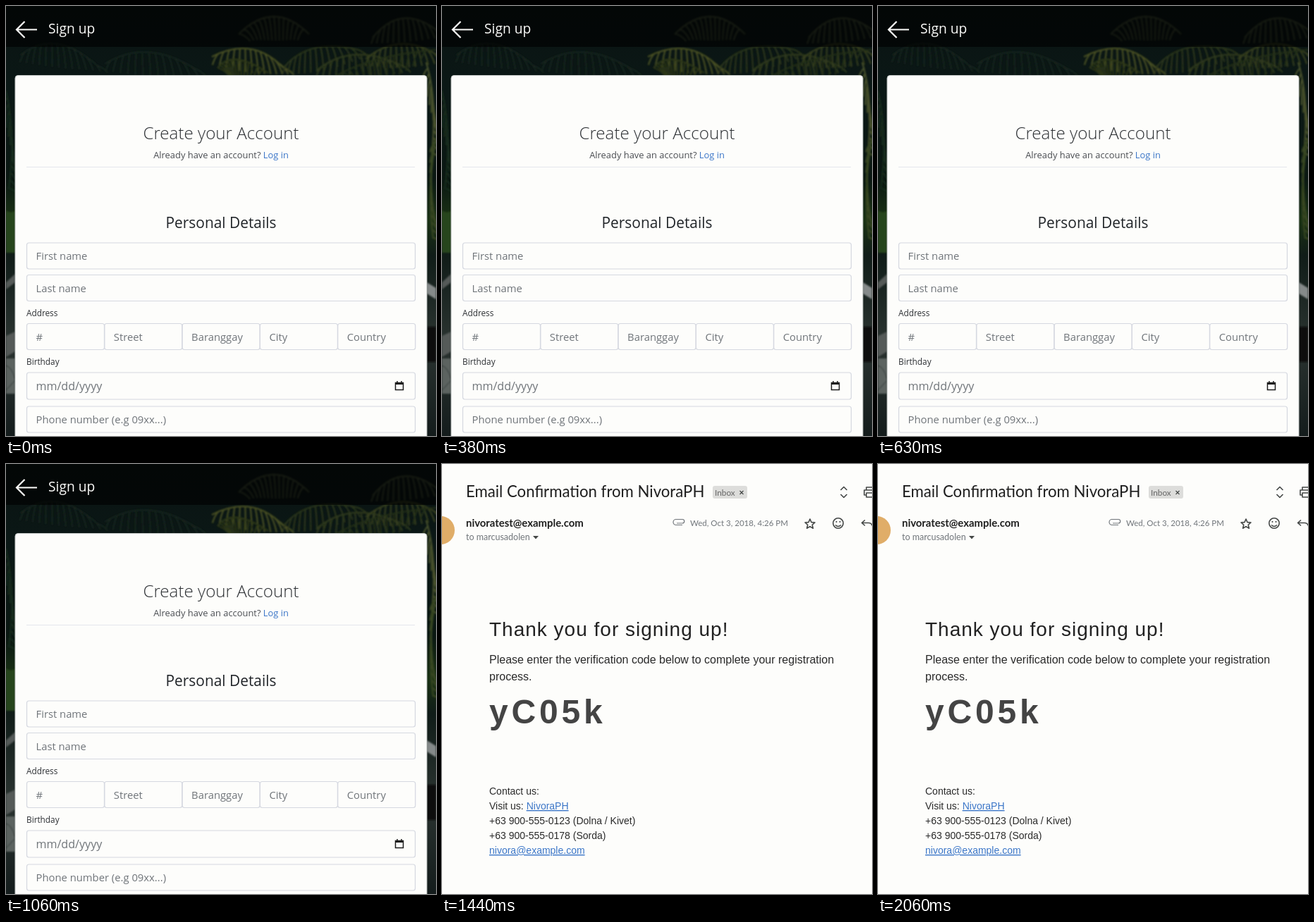
Write an HTML page that moves like this. It is 610 px wide and 610 px high and loops after 2.12 s.

```html
<!DOCTYPE html>
<html lang="en">
<head>
<meta charset="utf-8">
<title>Sign up</title>
<style>
  html, body { margin: 0; width: 100%; height: 100%; overflow: hidden; background: #fdfdfb; }
  svg { display: block; width: 610px; height: 610px; }
  #signup { font: 14.8px "Open Sans", "Noto Sans", sans-serif; }
  #mail { font-family: Lato, sans-serif; }
  .body { font: 14px "Liberation Sans", Arial, sans-serif; fill: #2a2a2a; }
  .hint { fill: #70757a; }
  .label { font-size: 11.8px; fill: #2c2f33; }
  .link { fill: #3b76c8; }
  .under { text-decoration: underline; }
  .field { fill: none; stroke: #d5d8e0; stroke-width: 1.2; }
  .icon { fill: none; stroke: #444746; stroke-width: 1.6; stroke-linejoin: round; }
  .thin { stroke-width: 1.2; }
</style>
</head>
<body>
<svg viewBox="0 0 610 610">
  <defs>
    <linearGradient id="jungle" x2="0" y2="1">
      <stop offset="0" stop-color="#0a1312"/>
      <stop offset=".2" stop-color="#0b1816"/>
      <stop offset=".4" stop-color="#0a1712"/>
      <stop offset=".5" stop-color="#1a3214"/>
      <stop offset=".58" stop-color="#101c18"/>
      <stop offset=".78" stop-color="#2a3330"/>
      <stop offset="1" stop-color="#141c1c"/>
    </linearGradient>
    <filter id="soft"><feGaussianBlur stdDeviation="1.2"/></filter>
  </defs>

  <g id="signup">
    <rect width="610" height="610" fill="url(#jungle)"/>
    <g filter="url(#soft)">
      <g id="fronds" fill="none" stroke-width="2.2"></g>
      <path d="M0 290q8 5 13 0v60H0z" fill="#27451a"/>
      <path d="M0 392l13-12v12L0 402zM0 468l13-6v28L0 498z" fill="#545a58"/>
      <path d="M0 500h13v50H0z" fill="#5c6360"/>
      <path d="M0 510q9 3 13 20M0 545l13-14" stroke="#2a302e" fill="none"/>
      <path d="M597 392l13 8v16l-13-8z" fill="#858a8a"/>
      <path d="M597 455h13v50h-13z" fill="#0a1010"/>
    </g>
    <rect width="610" height="58" fill="#000" opacity=".65"/>
    <path d="M44 33.5H15M26.5 22L15 33.5 26.5 45" fill="none" stroke="#fdfdfb" stroke-width="2.2"/>
    <text x="60" y="39" font-size="19.2" font-weight="500" fill="#fdfdfb">Sign up</text>

    <rect x="13" y="98.5" width="584" height="530" rx="4" fill="#fdfdfb" stroke="#c4c8c6"/>
    <text x="305" y="189" font-size="24.2" font-weight="300" text-anchor="middle" fill="#2c2f33">Create your Account</text>
    <text x="305" y="216" font-size="12.9" text-anchor="middle" fill="#4a4d52">Already have an account? <tspan class="link">Log in</tspan></text>
    <path d="M29 228.5H580" stroke="#e4e6ec"/>
    <text x="305" y="315" font-size="20.9" font-weight="500" text-anchor="middle" fill="#212529">Personal Details</text>
    <g id="form"></g>
    <text class="label" x="29" y="440">Address</text>
    <text class="label" x="29" y="509">Birthday</text>
    <path d="M552.5 534.5h11v10h-11zM555 532v3M561 532v3" fill="none" stroke="#1c1c1c" stroke-width="1.5"/>
    <path d="M552 534h12v3h-12z" fill="#1c1c1c"/>
  </g>

  <g id="mail">
    <rect width="610" height="610" fill="#fdfdfb"/>
    <text x="34" y="47" font-size="22.2" fill="#1f1f1f">Email Confirmation from NivoraPH</text>
    <rect x="384" y="31" width="49" height="18" rx="3" fill="#dddddb"/>
    <text x="387" y="44.5" font-size="11.8" fill="#666">Inbox</text>
    <path class="icon thin" d="M422.500 38l5 5M427.500 38l-5 5"/>
    <circle cx="-2" cy="94" r="20" fill="#e0ad68"/>
    <text x="34" y="89" font-size="14.9" font-weight="700" fill="#1f1f1f">nivoratest@example.com</text>
    <text x="34" y="108" font-size="12.5" fill="#70757a">to marcusadolen</text>
    <path d="M129 102h8l-4 4.5z" fill="#444746"/>
    <text x="352" y="88" font-size="11.5" fill="#70757a">Wed, Oct 3, 2018, 4:26 PM</text>
    <g class="icon">
      <path class="thin" d="M341 86.500h-9a3.500 3.500 0 0 1 0-8h9a2.700 2.700 0 0 1 0 5.500h-8" stroke="#70757a"/>
      <path d="M565.500 37l4.500-4.500 4.500 4.500M565.500 43l4.500 4.500 4.500-4.500"/>
      <path d="M602 37v-4h10M602 44h-3v-7h13M602 41h10v6h-10z"/>
      <path d="M522 78l2 4.600 5 .4-3.800 3.300 1.200 4.900-4.400-2.600-4.400 2.600 1.200-4.900-3.800-3.300 5-.4z"/>
      <circle cx="562" cy="84" r="7.200"/>
      <path d="M558 86.500q4 4 8 0M559.500 81v2M564.500 81v2"/>
      <path d="M600 79.500l-4.500 4 4.500 4M596 83.500h9q5 0 6 6"/>
    </g>

    <g class="body">
      <text x="67" y="244" font-size="28" letter-spacing="1" fill="#222">Thank you for signing up!</text>
      <g font-size="16">
        <text x="67" y="283">Please enter the verification code below to complete your registration</text>
        <text x="67" y="307">process.</text>
      </g>
      <text x="67" y="368" font-size="48" font-weight="700" letter-spacing="4.8" fill="#444">yC05k</text>
      <text x="67" y="469">Contact us:</text>
      <text x="67" y="490">Visit us: <tspan class="link under">NivoraPH</tspan></text>
      <text x="67" y="511">+63 900-555-0123 (Dolna / Kivet)</text>
      <text x="67" y="532">+63 900-555-0178 (Sorda)</text>
      <text x="67" y="553" class="link under">nivora@example.com</text>
    </g>
  </g>
</svg>
<script>
const $ = id => document.getElementById(id);

const field = (x, y, w, h, hint, size = 14.8) =>
  `<rect class="field" x="${x}" y="${y}" width="${w}" height="${h}" rx="3"/>
   <text class="hint" x="${x + 13}" y="${y + h / 2 + 5.5}" font-size="${size}">${hint}</text>`;

$('form').innerHTML =
  field(29.5, 336, 551, 37, 'First name') +
  field(29.5, 381.5, 551, 37, 'Last name') +
  ['#', 'Street', 'Baranggay', 'City', 'Country']
    .map((hint, i) => field(29.5 + i * 110.3, 450.5, 110, 37, hint)).join('') +
  field(29.5, 520, 551, 38, 'mm/dd/yyyy', 16.1) +
  field(29.5, 568, 551, 37, 'Phone number (e.g 09xx...)');

// A palm frond: a curved rib from a to c, pulled towards b, with hanging leaflets
function frond(ax, ay, bx, by, cx, cy, color) {
  const at = (a, b, c, u) => (1 - u) ** 2 * a + 2 * u * (1 - u) * b + u * u * c;
  let d = `M${ax} ${ay}Q${bx} ${by} ${cx} ${cy}`;
  for (let u = 0.08; u < 1; u += 0.07) {
    const drop = 10 + 24 * Math.sin(Math.PI * u);
    const lean = (u - 0.4) * 26;
    d += `M${at(ax, bx, cx, u)} ${at(ay, by, cy, u)}q${lean * 0.6} ${drop * 0.3} ${lean} ${drop}`;
  }
  return `<path d="${d}" stroke="${color}"/>`;
}

$('fronds').innerHTML =
  frond(292, 72, 350, 42, 394, 88, '#464d22') +
  frond(372, 95, 320, 60, 300, 88, '#2b3519') +
  frond(395, 86, 430, 45, 500, 62, '#2a351a') +
  frond(440, 92, 490, 50, 560, 84, '#2e391c') +
  frond(510, 75, 560, 35, 612, 70, '#343d1e') +
  frond(610, 62, 520, 70, 470, 98, '#222d18') +
  frond(20, 70, 70, 30, 130, 85, '#14231c') +
  frond(140, 82, 200, 45, 270, 90, '#15241c') +
  frond(430, 40, 380, -10, 330, 40, '#38452e') +
  frond(520, 45, 560, -5, 612, 35, '#38452e') +
  frond(596, 80, 612, 130, 604, 210, '#46502a') +
  frond(612, 180, 596, 250, 606, 330, '#374620') +
  frond(0, 120, 14, 180, 4, 260, '#182b1c');

const LOOP = 2120, MAIL_AT = 1130;
function draw() {
  const inMail = performance.now() % LOOP >= MAIL_AT;
  $('mail').style.display = inMail ? '' : 'none';
  $('signup').style.display = inMail ? 'none' : '';
  requestAnimationFrame(draw);
}
draw();
</script>
</body>
</html>
```
